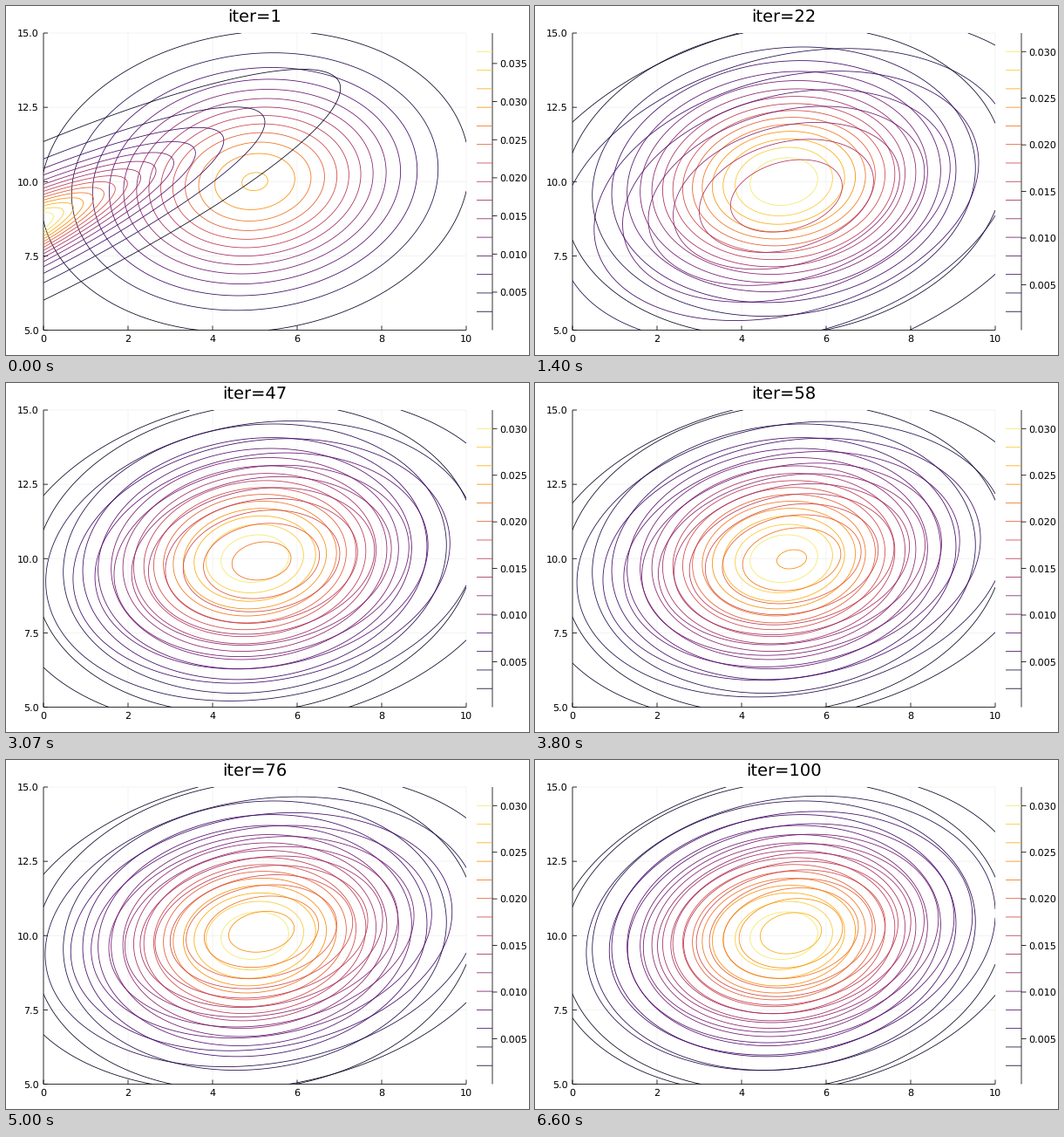
A matplotlib script that plays this animation: 600x400 px, repeating every 6670 ms.

```python
import numpy as np
import matplotlib.pyplot as plt
from matplotlib.animation import FuncAnimation

W, H, DPI = 600, 400, 100
LEFT, RIGHT, TOP, BOTTOM = 43, 528, 31, 371.5
BAR = 558
FRAMES, FPS = 100, 15
PX = 72 / DPI
THIN = 0.8 * PX
SMALL, LARGE = 8, 14

plt.rcParams["font.family"] = "DejaVu Sans"
plt.rcParams["text.hinting"] = "none"
fig = plt.figure(figsize=(W / DPI, H / DPI), dpi=DPI, facecolor="white")

# Pixel-space layer for axes, labels and colour bar
stage = fig.add_axes([0, 0, 1, 1])
stage.set(xlim=(0, W), ylim=(H, 0))
stage.axis("off")
ax = fig.add_axes([LEFT / W, 1 - BOTTOM / H, (RIGHT - LEFT) / W, (BOTTOM - TOP) / H])
ax.set(xlim=(0, 10), ylim=(5, 15))
ax.axis("off")

x, y = np.meshgrid(np.linspace(0, 10, 121), np.linspace(5, 15, 121))
COLORS = plt.get_cmap("inferno")(np.arange(1, 16) / 16)

# n, mean x, mean y, scale xx, xy, yy of the predictive Student t
KEYS = np.array([
    [1, -1.43, 7.77, 10.6, 6.73, 5.36],
    [22, 5.06, 9.52, 10.15, 2.5, 8.65],
    [36, 5.11, 9.83, 8.2, 0.85, 7.22],
    [58, 5.186, 9.978, 7.3, 1.13, 6.08],
    [76, 5.155, 10.13, 7.25, 1.08, 5.72],
    [91, 5.165, 10.06, 6.55, 0.88, 5.45],
    [100, 5.165, 10.08, 6.2, 0.85, 5.65],
])


def outer(mx, my):
    return np.array([mx * mx, mx * my, my * my])


def to_sums(n, mx, my, *scale):
    k = n + 1
    spread = np.array(scale) * k * k / (k + 1)
    return np.concatenate([[k * mx, k * my], spread + k * outer(mx, my)])


SUMS = np.array([to_sums(*key) for key in KEYS])


def posterior(n):
    """Sums of the data grow evenly with n between the keys."""
    k = n + 1
    s = np.array([np.interp(n, KEYS[:, 0], col) for col in SUMS.T])
    mx, my = s[:2] / k
    return mx, my, (s[2:] - k * outer(mx, my)) * (k + 1) / (k * k)


def quad_form(mx, my, scale):
    a, b, c = scale
    det = a * c - b * b
    dx, dy = x - mx, y - my
    return (c * dx**2 - 2 * b * dx * dy + a * dy**2) / det, 2 * np.pi * np.sqrt(det)


def normal(mx, my, scale):
    q, norm = quad_form(mx, my, scale)
    return np.exp(-q / 2) / norm


def student(mx, my, scale, nu):
    q, norm = quad_form(mx, my, scale)
    return (1 + q / nu) ** (-(nu + 2) / 2) / norm


def line(x0, y0, x1, y1, color="black", z=2):
    return stage.plot([x0, x1], [y0, y1], color=color, lw=THIN, snap=False,
                      solid_capstyle="butt", zorder=z)[0]


def label(px, py, s, ha, va="center_baseline", size=SMALL):
    return stage.text(px, py, s, ha=ha, va=va, fontsize=size)


def draw_frame():
    for i in range(6):
        px = LEFT + (RIGHT - LEFT) * i / 5
        line(px, TOP, px, BOTTOM, "#f0f0f0", z=1)
        line(px, BOTTOM, px, BOTTOM - 5)
        label(px, 385, str(2 * i), "center", "baseline")
    for i in range(5):
        py = BOTTOM + (TOP - BOTTOM) * i / 4
        line(LEFT, py, RIGHT, py, "#f0f0f0", z=1)
        line(LEFT, py, LEFT + 5, py)
        label(38, py, f"{5 + 2.5 * i:.1f}", "right")
    line(LEFT, TOP, LEFT, BOTTOM)
    line(LEFT, BOTTOM, RIGHT, BOTTOM)
    line(BAR, TOP, BAR, BOTTOM)


draw_frame()
title = label((LEFT + RIGHT) / 2, 18, "", "center", "baseline", LARGE)
bars = [line(540, 0, BAR, 0, c) for c in COLORS]
ticks = [(line(BAR, 0, BAR + 5.5, 0), label(566, 0, f"{0.005 * i:.3f}", "left"), 0.005 * i)
         for i in range(1, 10)]

truth = normal(5, 10, (5, 0.5, 5))
shown = []


def update(i):
    while shown:
        shown.pop().remove()
    n = i + 1
    guess = student(*posterior(n), n + 1)
    lo = min(truth.min(), guess.min())
    hi = max(truth.max(), guess.max())
    levels = np.linspace(lo, hi, 17)[1:-1]
    for z in (truth, guess):
        shown.append(ax.contour(x, y, z, levels=levels, colors=COLORS, linewidths=THIN))

    def bar_y(v):
        return BOTTOM - (v - lo) / (hi - lo) * (BOTTOM - TOP)

    for bar, v in zip(bars, levels):
        bar.set_ydata([bar_y(v)] * 2)
    for mark, text, v in ticks:
        mark.set_ydata([bar_y(v)] * 2)
        text.set_y(bar_y(v))
        mark.set_visible(v <= hi)
        text.set_visible(v <= hi)
    title.set_text(f"iter={n}")
    return []


anim = FuncAnimation(fig, update, frames=FRAMES, init_func=lambda: [],
                     interval=1000 / FPS, repeat=True, repeat_delay=0)
plt.show()
```
